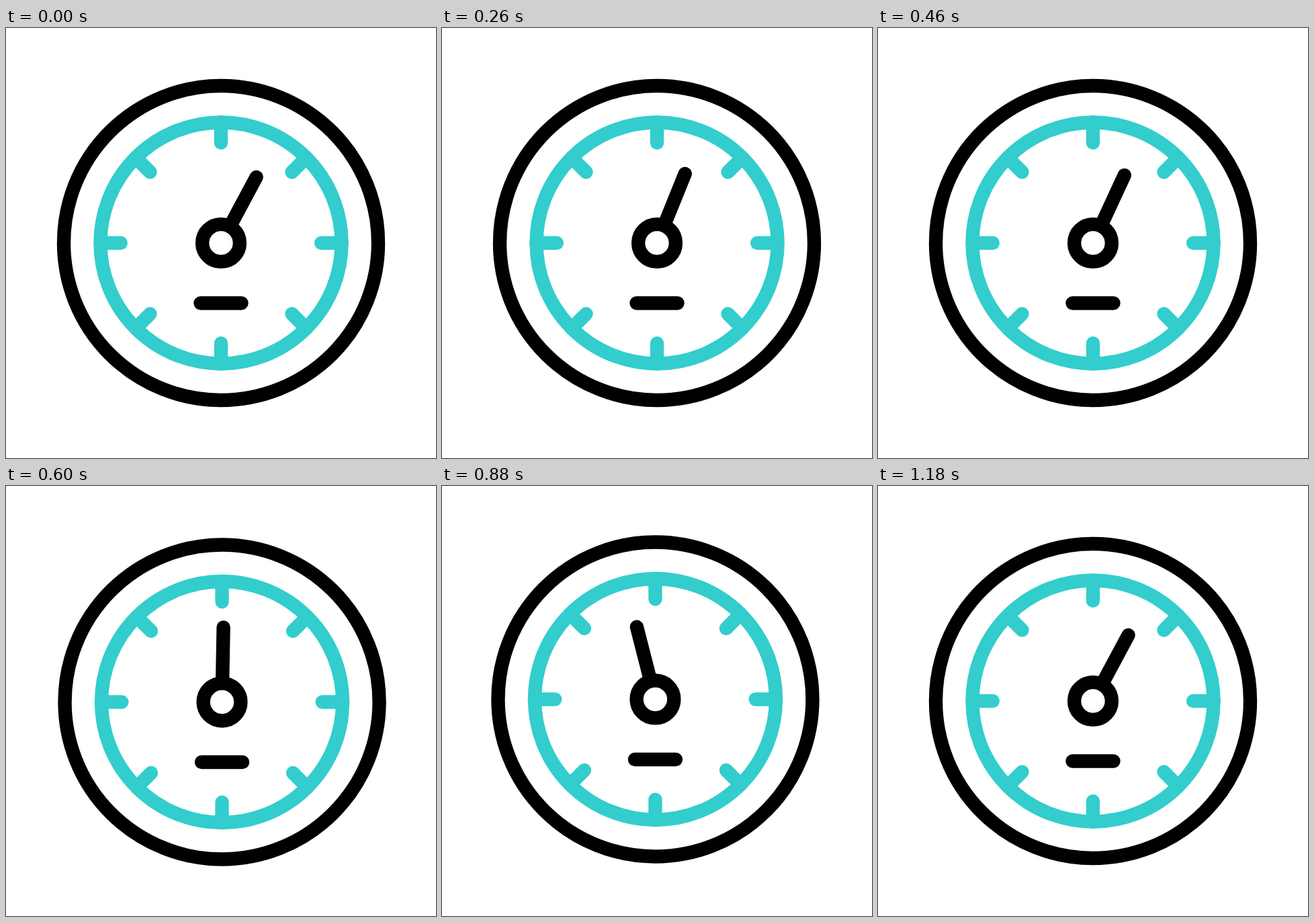
An HTML page for the animation above (1200 ms loop, 640 by 640 pixels).

```html
<!DOCTYPE html>
<html lang="en">
<head>
<meta charset="utf-8">
<title>Gauge</title>
<style>
  html, body { margin: 0; width: 100%; height: 100%; overflow: hidden; background: #fff; }
  svg { display: block; width: 100vw; height: 100vh; }
  g { fill: none; stroke-width: 20.4; stroke-linecap: round; }
  .ink { stroke: #000; }
  .scale { stroke: #33cdcd; }
</style>
</head>
<body>
<svg viewBox="0 0 640 640">
  <g id="dial" transform="translate(320 320)">
    <g class="ink">
      <circle r="234"/>
      <path d="M-30.5 89.5H30.5"/>
    </g>
    <g class="scale" id="scale"><circle r="179.5"/></g>
    <g class="ink">
      <path id="needle" d="M0-28V-111.2" transform="rotate(28.2)"/>
      <circle r="27.9"/>
    </g>
  </g>
</svg>
<script>
const FRAME_MS = 20, FRAMES = 60, CYCLE = 18;
const dial = document.getElementById('dial');
const needle = document.getElementById('needle');
const scale = document.getElementById('scale');

for (let a = 0; a < 360; a += 45) {
  const tick = document.createElementNS('http://www.w3.org/2000/svg', 'path');
  tick.setAttribute('d', 'M0-179.5V-149.2');
  tick.setAttribute('transform', `rotate(${a})`);
  scale.append(tick);
}

// One shake cycle: [frame, x, y]
const shake = [
  [2.5, -6.4, 0], [5, 0, 0], [8, -2.56, -2.56], [10.5, 3.84, 3.84],
  [13, 0, 0], [15.5, 6.4, 0], [18, -0.7, -0.5]
];
const shakeTrack = [[0, 0, 0]];
for (let c = 0; c < 4; c++) {
  for (const [f, x, y] of shake) shakeTrack.push([f + c * CYCLE, x, y]);
}

// Needle angle: [frame, degrees]
const swing = [[0, 28.2], [9, 17.7], [19, 30], [40, -24], [55, 31], [59, 28.2]];

const linear = u => u;
const smooth = u => u * u * (3 - 2 * u);

function sample(track, frame, ease) {
  let i = 1;
  while (i < track.length - 1 && track[i][0] < frame) i++;
  const [t0, ...from] = track[i - 1];
  const [t1, ...to] = track[i];
  const k = ease((frame - t0) / (t1 - t0));
  return from.map((v, n) => v + (to[n] - v) * k);
}

function draw() {
  const frame = Math.floor(performance.now() / FRAME_MS) % FRAMES;
  const [x, y] = sample(shakeTrack, frame, linear);
  const [angle] = sample(swing, frame, smooth);
  dial.setAttribute('transform', `translate(${320 + x} ${320 + y})`);
  needle.setAttribute('transform', `rotate(${angle})`);
  requestAnimationFrame(draw);
}
draw();
</script>
</body>
</html>
```
